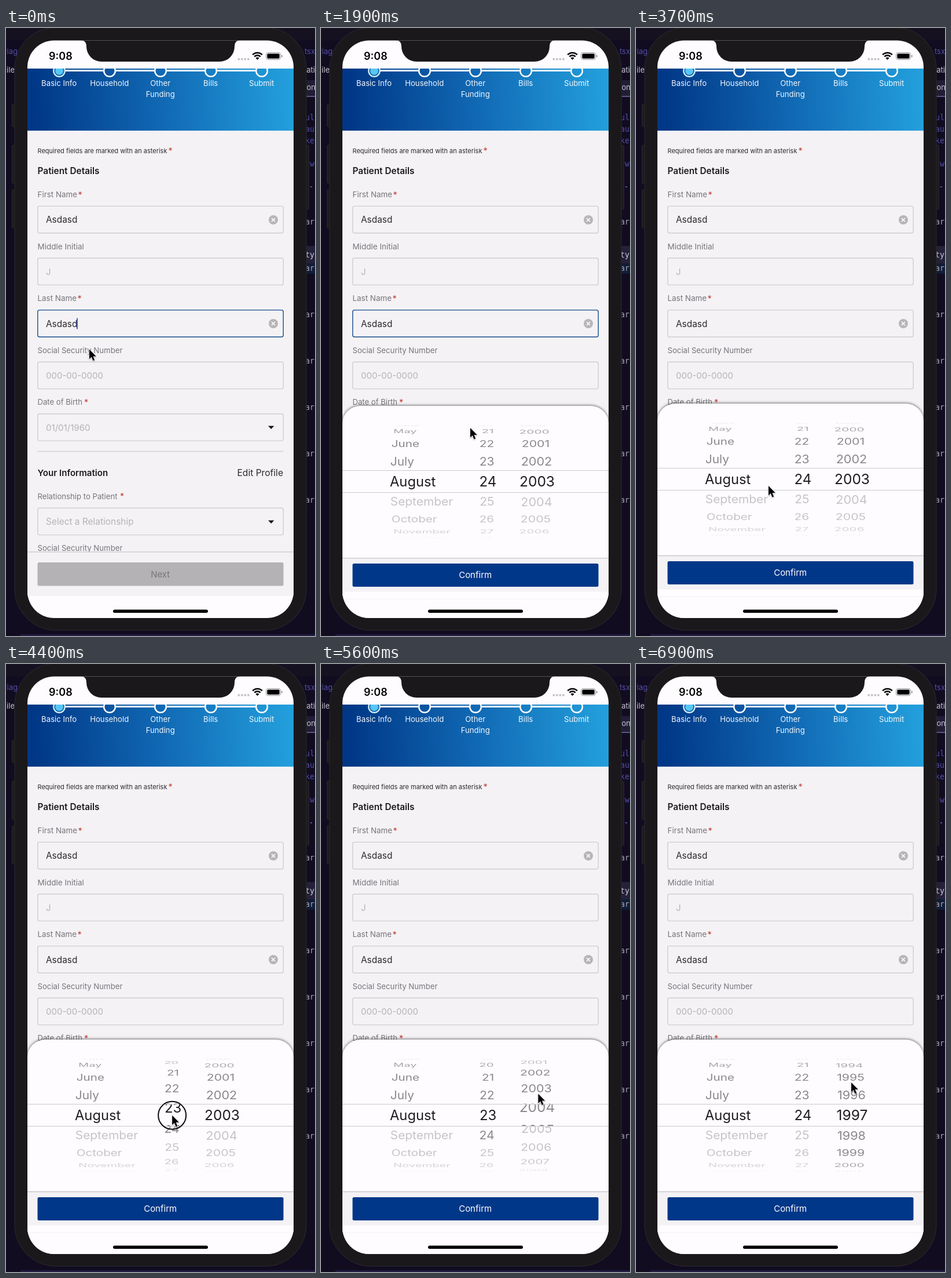
Animation of 534x1049 px, one loop 7000 ms. Source, as an HTML page:

```html
<!DOCTYPE html>
<html lang="en">
<head>
<meta charset="utf-8">
<title>Date of birth picker</title>
<style>
html, body { margin: 0; width: 100%; height: 100%; overflow: hidden; background: #110c20; }
svg { display: block; width: 100%; height: 100%; font-family: Inter, Roboto, sans-serif; }
.mono { font-family: "DejaVu Sans Mono", "Noto Sans Mono", monospace; }
#panel { filter: drop-shadow(0 -1px 2px rgba(0, 0, 0, .55)); }
</style>
</head>
<body>
<svg id="stage" viewBox="0 0 534 1049" xmlns="http://www.w3.org/2000/svg"></svg>
<script>
const LOOP = 7000, STEP = 100;
const INK = '#2b292d', LABEL = '#77757a', HINT = '#b5b3b7', NAVY = '#003788', RED = '#c23b30';
const MONTHS = ['January', 'February', 'March', 'April', 'May', 'June', 'July',
  'August', 'September', 'October', 'November', 'December'];

const text = (x, y, str, size, fill, extra = '') =>
  `<text x="${x}" y="${y}" font-size="${size}" fill="${fill}" ${extra}>${str}</text>`;
const rect = (x, y, w, h, fill, extra = '') =>
  `<rect x="${x}" y="${y}" width="${w}" height="${h}" fill="${fill}" ${extra}/>`;
const line = (x1, y, x2, stroke, w = 1) =>
  `<path d="M${x1} ${y}H${x2}" stroke="${stroke}" stroke-width="${w}"/>`;
const MID = 'text-anchor="middle"', END = 'text-anchor="end"', SEMI = 'font-weight="600"';

const star = (x, y) => text(x, y, '*', 14.5, RED);
const label = (y, str, size, starX) =>
  text(54.5, y, str, size, LABEL) + (starX ? star(starX, y + .5) : '');
const field = (y, str, size, fill, id = '') =>
  rect(54.8, y, 424.4, 46.4, 'none', `rx="3" stroke="#d0ced1" stroke-width="1.4" ${id}`) +
  text(69, y + 29, str, size, fill);
const clear = y => `<circle cx="462" cy="${y}" r="8" fill="#b7b5b8"/>
  <path d="M459 ${y - 3}l6 6m0-6l-6 6" stroke="#fff" stroke-width="1.6"/>`;
const caretDown = y => `<path d="M453 ${y - 2.5}h10.4l-5.2 5.4z" fill="#171518"/>`;

function editor() {
  const blue = '#534fa5', pale = '#aaa7b5';
  const code = [['ul', 159, blue], ['au', 179, blue], ['ke', 199, blue], ['&nbsp;w', 239, blue],
    ['ty', 396, '#c9c6d6'], ...[339, 419, 499, 579, 659, 739, 819].map(y => ['ar', y, pale])];
  return rect(0, 0, 534, 1049, '#110c20') + rect(0, 0, 534, 21, '#151121') +
    text(20, 45, 'riag', 13, blue, END) + text(15, 77, 'ile', 13, '#c7c5cf', END) +
    rect(500, 90, 34, 28, '#221d36') + line(500, 118, 534, '#5b5780', 2) +
    text(534, 45, 'tsx', 13, blue, END) + text(534, 77, 'ati', 13, '#c7c5cf', END) +
    text(535, 107, 'ion', 13, '#c7c5cf', END) +
    rect(500, 376, 34, 30, '#25213a') + rect(500, 406, 34, 18, '#101d38') +
    code.map(([s, y, c]) => text(517, y, s, 13.3, c, 'class="mono"')).join('') +
    rect(526, 273, 3, 2, blue) + rect(25, 1046, 509, 3, '#211c40');
}

function phone() {
  const key = (x, y, h) => rect(x, y, 8, h, '#1d1b1e', 'rx="2" stroke="#2b292c"');
  return key(10.5, 132, 38) + key(10.5, 202, 66) + key(10.5, 279, 66) + key(515.5, 202, 111) +
    rect(15, -1, 504, 1040, '#1a181b', 'rx="72" stroke="#252326" stroke-width="1.5"');
}

function header() {
  const steps = [['Basic Info', 92], ['Household', 179], ['Other', 267], ['Bills', 354], ['Submit', 442]];
  const dot = ([, x], i) => i
    ? `<circle cx="${x}" cy="74" r="9.8" fill="url(#sky)" stroke="#fff" stroke-width="2.5"/>`
    : `<circle cx="${x}" cy="74" r="9.8" fill="#0d5fa8" stroke="#d5f1fd" stroke-width="2.2"/>
       <circle cx="${x}" cy="74" r="7" fill="#58c6f5"/>`;
  return `<g clip-path="url(#head)">` + rect(37, 70, 460, 107.5, 'url(#sky)') +
    line(92, 73.5, 442, '#fff', 3) + steps.map(dot).join('') + '</g>' +
    steps.map(([s, x]) => text(x - .3, 100, s, 13.2, '#f2f7fc', MID)).join('') +
    text(266.7, 118.5, 'Funding', 13.2, '#f2f7fc', MID);
}

function form() {
  return rect(37, 177.5, 460, 727, '#f4f2f5') +
    text(54.5, 216, 'Required fields are marked with an asterisk', 11, INK) + star(280.5, 217) +
    text(54.5, 252, 'Patient Details', 15.4, '#1d1b1f', SEMI) +
    label(292, 'First Name', 13.4, 124.5) + field(307.4, 'Asdasd', 15.4, INK) + clear(331) +
    label(381.5, 'Middle Initial', 13.5) + field(397, 'J', 15, HINT) +
    label(471, 'Last Name', 13.4, 123.5) + field(486.6, 'Asdasd', 15.4, INK, 'id="last"') + clear(510) +
    rect(122, 500.5, 2, 19, '#3f63c8', 'id="caret"') +
    label(560.5, 'Social Security Number', 13.2) + field(576.2, '000-00-0000', 15, HINT) +
    label(650, 'Date of Birth', 13.1, 135) + field(665.7, '01/01/1960', 15.1, HINT) + caretDown(689) +
    line(54.5, 730.5, 479.5, '#d3d1d4', 1.3) +
    text(54.5, 773, 'Your Information', 15.1, '#1d1b1f', SEMI) +
    text(479, 773, 'Edit Profile', 15.6, INK, END) +
    label(812.5, 'Relationship to Patient', 13.15, 197) +
    field(828.2, 'Select a Relationship', 15.45, HINT) + caretDown(852) +
    label(902, 'Social Security Number', 13.2) +
    rect(37, 904, 460, 76, '#f4f2f5') + line(37, 904, 497, '#cfcdd0', 1.4) +
    rect(54.5, 922, 425, 40.5, '#b4b2b5', 'rx="2.5"') + text(266.7, 947.5, 'Next', 14.9, LABEL, MID);
}

function statusBar() {
  const arc = r => `M${434.5 - r * .72} ${54.5 - r * .72}A${r} ${r} 0 0 1 ${434.5 + r * .72} ${54.5 - r * .72}`;
  return text(74, 55, '9:08', 18, '#000', SEMI) +
    [400.5, 406, 411.5, 417].map(x => rect(x, 52, 3.6, 3.6, '#c4c2c5', 'rx="1"')).join('') +
    `<path d="${arc(11.5)}${arc(7.2)}" fill="none" stroke="#000" stroke-width="2.6"/>
     <path d="M434.5 55l-3-3.2a4.4 4.4 0 0 1 6 0z"/>` +
    rect(449.5, 42.5, 25, 12, 'none', 'rx="3.6" stroke="#8f8d90"') +
    rect(451.3, 44.3, 21.4, 8.4, '#000', 'rx="2"') + rect(476, 46.5, 1.6, 4, '#8f8d90', 'rx=".8"');
}

function panel() {
  return `<g id="panel"><path d="M37 1500V678a31 30 0 0 1 31-30H466a31 30 0 0 1 31 30V1500z" fill="#fefcfe"/></g>` +
    line(37, 759.5, 497, '#cbc9cc') + line(37, 797.5, 497, '#cbc9cc') +
    '<g id="rows" clip-path="url(#outer)"></g><g id="lens" clip-path="url(#band)"></g>' +
    rect(37, 910.5, 460, 58, '#f4f2f5') + line(37, 910.5, 497, '#c9c7ca', 1.3) +
    rect(54.5, 920, 425, 40, NAVY, 'rx="2.5"') + text(266.7, 945, 'Confirm', 15, '#fff', MID) +
    line(37, 981, 497, '#f1eff2');
}

stage.innerHTML = `<defs>
  <linearGradient id="sky" gradientUnits="userSpaceOnUse" x1="45" y1="100" x2="492" y2="78">
    <stop offset="0" stop-color="#003786"/><stop offset=".5" stop-color="#1169b4"/>
    <stop offset="1" stop-color="#239fdc"/></linearGradient>
  <clipPath id="screen"><rect x="37" y="21.5" width="460" height="996.5" rx="46"/></clipPath>
  <clipPath id="head"><rect x="37" y="70" width="460" height="107.5"/></clipPath>
  <clipPath id="band"><rect x="37" y="760" width="460" height="37"/></clipPath>
  <clipPath id="outer"><path d="M37 680H497V759H37zM37 798H497V878H37z"/></clipPath></defs>` +
  editor() + phone() +
  '<g clip-path="url(#screen)">' + rect(37, 20, 460, 1000, '#fefcfe') + header() + form() +
  '<g id="sheet">' + panel() + '</g>' + statusBar() +
  `<path d="M128 21q11 0 11 11a26 26 0 0 0 26 26H369a26 26 0 0 0 26-26q0-11 11-11z" fill="#1a181b"/>` +
  rect(185, 1003.5, 164, 5.4, '#000', 'rx="2.7"') + '</g>' +
  `<g id="mouse"><circle id="ring" r="24" fill="none" stroke="#0b0a0c" stroke-width="2"/>
   <path d="M0 0V16.5L3.8 13 6.5 19.5 9.2 18.4 6.5 12H11.8z" stroke="#fff" stroke-width="1.2"
     paint-order="stroke" stroke-linejoin="round" style="filter:drop-shadow(0 1px 1px rgba(0,0,0,.3))"/></g>`;

// Eased value along [time, value] points
function track(points, t) {
  const i = points.findIndex(p => p[0] > t);
  if (i < 0) return points[points.length - 1][1];
  if (!i) return points[0][1];
  const [t0, a] = points[i - 1], [t1, b] = points[i], p = (t - t0) / (t1 - t0);
  return a + (b - a) * p * p * (3 - 2 * p);
}

const mouseX = [[300, 144], [1000, 136], [1450, 136], [1850, 258], [2300, 258], [3300, 229],
  [3700, 229], [4150, 286], [4600, 288], [4950, 391], [5150, 391], [5500, 376], [6100, 367.5],
  [6400, 374], [6800, 372]];
const mouseY = [[300, 554.5], [1000, 689], [1450, 689], [1850, 690], [2300, 690], [3300, 790],
  [3700, 790], [4150, 738], [4600, 808], [4950, 811.5], [5100, 811.5], [5500, 742], [6100, 734.5],
  [6400, 805], [6800, 722]];
const presses = [[1200, 1450], [4150, 4600], [5000, 5500], [6050, 6400]];
const dayAt = [[4150, 24], [4800, 22], [5400, 22], [5800, 24]];
const yearAt = [[5100, 2003], [5500, 2004.6], [5900, 2003], [6000, 2003], [6100, 2003.04],
  [6400, 2000.8], [6800, 1997]];

// Columns: base x, x inside the lens, anchor, font size, last allowed value, label
const columns = [
  { x: 119, lensX: 119, anchor: 'start', size: 21, max: 8, name: v => MONTHS[(v + 11) % 12] },
  { x: 299.8, lensX: 303.3, anchor: 'end', size: 21.2, max: 24, name: v => (v + 30) % 31 + 1 },
  { x: 373, lensX: 373.5, anchor: 'middle', size: 21.7, max: 2003, name: v => v }
];

function wheel(col, value, lens) {
  const zoom = lens ? 1.13 : 1, near = Math.round(value);
  let out = '';
  for (let v = near - 4; v <= near + 4; v++) {
    const angle = (v - value) * 21 * Math.PI / 180, c = Math.cos(angle);
    if (c < .05 || lens && Math.abs(v - value) > 1) continue;
    const depth = 1 - .075 * (1 - c), size = col.size * zoom * depth;
    const x = lens ? col.lensX : 267 + (col.x - 267) * depth;
    const y = 778.5 + 97 * Math.sin(angle) * zoom;
    const late = v > col.max;
    const alpha = lens ? (late ? .5 : 1) : (late ? .25 : .52) * Math.min(1, c * 1.6);
    out += `<g transform="translate(${x} ${y}) scale(1 ${c})">` +
      text(0, size * .363, col.name(v), size, '#1f1d21', `text-anchor="${col.anchor}" opacity="${alpha}"`) + '</g>';
  }
  return out;
}

const get = id => document.getElementById(id);
const put = (id, name, value) => get(id).setAttribute(name, value);

function draw(t) {
  const values = [8, track(dayAt, t), track(yearAt, t)];
  get('rows').innerHTML = columns.map((c, i) => wheel(c, values[i], false)).join('');
  get('lens').innerHTML = columns.map((c, i) => wheel(c, values[i], true)).join('');

  const open = Math.min(1, Math.max(0, (t - 1500) / 510));
  put('sheet', 'transform', `translate(0 ${402 * (1 - open) ** 3})`);
  put('sheet', 'visibility', open ? 'visible' : 'hidden');

  const focused = t < 2100;
  put('last', 'stroke', focused ? '#174c8c' : '#d0ced1');
  const blink = Math.abs((t + 200) % 1000 - 200);
  put('caret', 'opacity', t < 1500 ? Math.min(1, Math.max(0, (320 - blink) / 130)) : 0);

  put('mouse', 'transform', `translate(${track(mouseX, t)} ${track(mouseY, t)})`);
  put('ring', 'visibility', presses.some(([a, b]) => t >= a && t < b) ? 'visible' : 'hidden');
}

let start, last = -1;
function tick(now) {
  start ??= now;
  const t = Math.floor((now - start) % LOOP / STEP) * STEP;
  if (t !== last) draw(last = t);
  requestAnimationFrame(tick);
}
draw(0);
requestAnimationFrame(tick);
</script>
</body>
</html>
```
